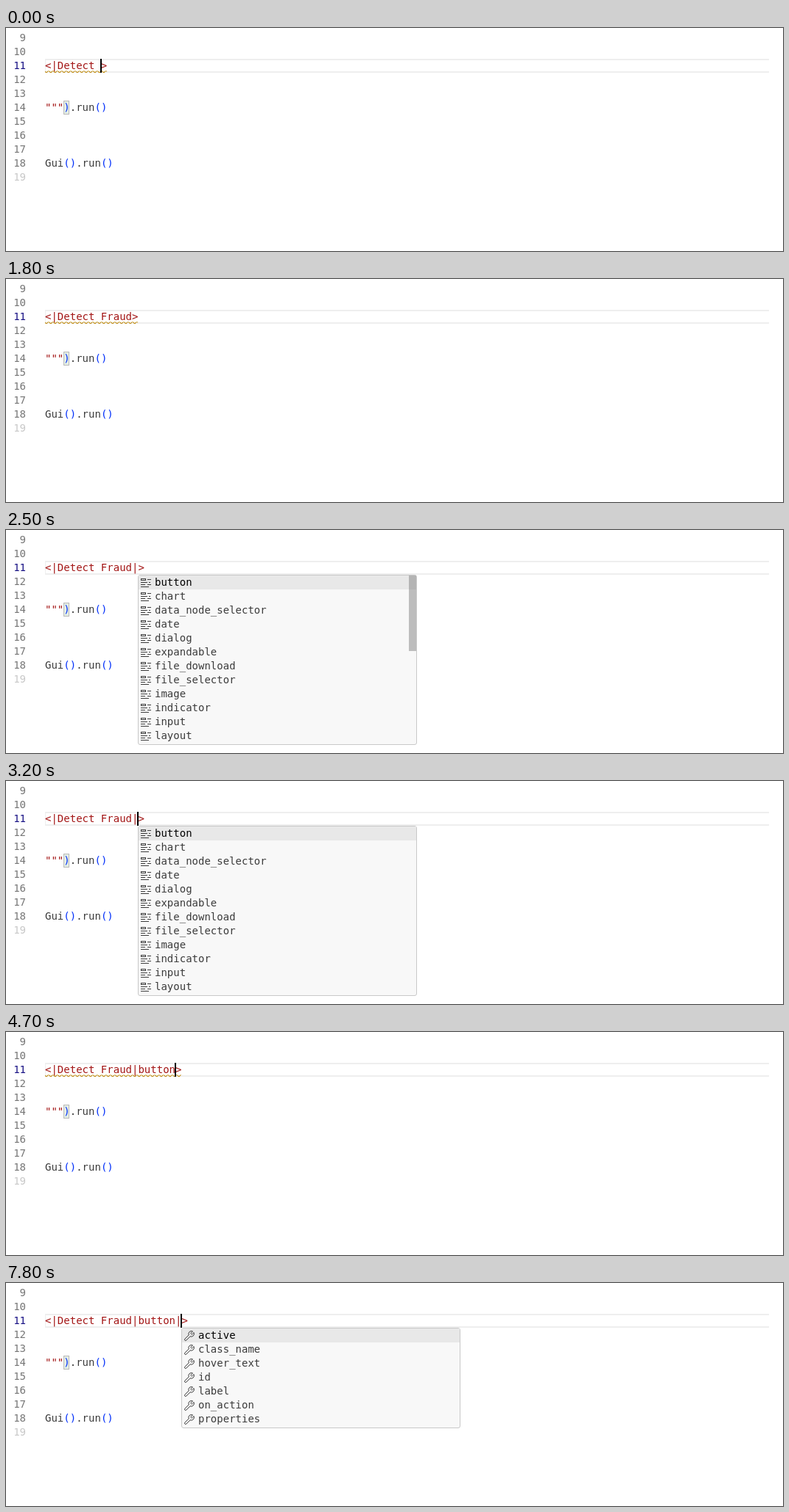
Recreate the animation shown at these times as an HTML page. Size 1055 by 304 pixels, loop 8 s.

```html
<!DOCTYPE html>
<html>
<head>
<meta charset="utf-8">
<style>
html, body { margin: 0; width: 100%; height: 100%; overflow: hidden; background: #fff; }
body { position: relative; font: 14px/19px "DejaVu Sans Mono", monospace; color: #3b3b3b; }
div, svg { position: absolute; white-space: pre; box-sizing: border-box; }
b { font-weight: normal; color: #0431fa; }
.str, i { color: #a31515; font-style: normal; }
.code { left: 53px; }
.num { left: 0; width: 27px; text-align: right; color: #767676; }
.num.active { color: #171184; }
.num.last { color: #c8c8c8; }
#current { left: 53px; top: 42px; width: 983px; height: 19px; border: solid #eee; border-width: 2px 0 2px 1px; }
#match { left: 78px; top: 99px; width: 8px; height: 19px; background: rgba(0,100,0,.1); border: 1px solid #b9b9b9; }
#wave { left: 53px; top: 58px; height: 3px; }
#caret { top: 42px; width: 2px; height: 19px; background: #000; }
.popup { top: 61px; width: 379px; background: #f8f8f8; border: 1px solid #c8c8c8; border-radius: 3px; }
.row { left: 0; width: 377px; height: 19px; padding-left: 22px; }
.row:first-child { background: #e8e8e8; color: #000; }
.row svg { left: 2px; top: 2px; width: 16px; height: 16px; }
.slider { left: 367px; width: 10px; background: rgba(100,100,100,.4); }
</style>
</head>
<body>
<div id="current"></div>
<div id="match"></div>
<div id="line" class="code str" style="top:42px"></div>
<div class="code" style="top:99px"><i>"""</i><b>)</b>.run<b>()</b></div>
<div class="code" style="top:175px">Gui<b>()</b>.run<b>()</b></div>
<svg id="wave">
  <pattern id="zigzag" width="6" height="3" patternUnits="userSpaceOnUse">
    <path fill="#bf8803" d="M5.5 0L2.5 3H1.1L4.1 0zM4 0L6 2V.6L5.4 0zM0 2L1 3H2.4L0 .6z"/>
  </pattern>
  <rect width="100%" height="3" fill="url(#zigzag)"/>
</svg>
<div id="caret"></div>
<script>
const LOOP = 8000, CHAR = 8.4287, LEFT = 53, ROW = 19;
const $ = id => document.getElementById(id);

function add(parent, cls, style, html = '') {
  const el = document.createElement('div');
  el.className = cls;
  el.style.cssText = style;
  el.innerHTML = html;
  parent.append(el);
  return el;
}

for (let n = 9; n <= 19; n++)
  add(document.body, 'num' + (n === 11 ? ' active' : n === 19 ? ' last' : ''), `top:${4 + (n - 9) * ROW}px`, n);

const keywordIcon = '<path fill="#3b3b3b" d="M15 4h-5V3h5zM14 7h-2v1h2zM10 7H1v1h9zM12 13H1v1h11zM7 10H1v1h6zM15 10h-5v1h5zM8 2v3H1V2zM7 3H2v1h5z"/>';
const wrenchIcon = '<path fill="none" stroke="#3b3b3b" d="M12.5 2A3.8 3.8 0 0 0 7.2 6.9L1.9 12.2A1.3 1.3 0 0 0 3.8 14.1L9.1 8.8A3.8 3.8 0 0 0 14 3.6L11.4 6.2 9.7 4.5z"/>';

function popup(left, icon, words) {
  const names = words.split(' ');
  const box = add(document.body, 'popup', `left:${left}px;height:${names.length * ROW + 4}px`);
  names.forEach((name, i) =>
    add(box, 'row', `top:${i * ROW}px`, `<svg viewBox="0 0 16 16">${icon}</svg>${name}`));
  return box;
}

const controls = popup(179, keywordIcon,
  'button chart data_node_selector date dialog expandable file_download file_selector image indicator input layout');
const properties = popup(238, wrenchIcon,
  'active class_name hover_text id label on_action properties');
const sliderTop = add(controls, 'slider', 'top:0;height:19px');
const sliderRest = add(controls, 'slider', 'top:19px;height:84px');
document.body.append($('caret'));

// Each list holds [start time, value] pairs.
const typing = [[0, ''], [500, 'F'], [900, 'Fr'], [1000, 'Fra'], [1100, 'Frau'], [1300, 'Fraud'],
  [2000, 'Fraud|'], [4700, 'Fraud|button'], [5800, 'Fraud|button|']];
const fadeTop = [[0, 1], [2900, .65], [3000, .35], [3200, 0]];
const fadeRest = [[0, 1], [2700, .65], [2900, .35], [3000, 0]];
const at = (list, t) => list.findLast(step => step[0] <= t);
const show = (el, on) => el.style.visibility = on ? 'visible' : 'hidden';

function draw(now) {
  const t = now % LOOP;
  const [typedAt, typed] = at(typing, t);
  const text = '<|Detect ' + typed;
  $('line').textContent = text + '>';
  $('wave').style.width = (text.length + 1) * CHAR + 'px';
  show($('wave'), !typed.endsWith('|'));
  $('caret').style.left = Math.round(LEFT + text.length * CHAR) - 1 + 'px';
  show($('caret'), (t - typedAt) % 1000 < 500);
  show(controls, t >= 2100 && t < 4700);
  show(properties, t >= 5800);
  sliderTop.style.opacity = at(fadeTop, t)[1];
  sliderRest.style.opacity = at(fadeRest, t)[1];
}

const start = performance.now();
function tick() {
  draw(performance.now() - start);
  requestAnimationFrame(tick);
}
tick();
</script>
</body>
</html>
```
